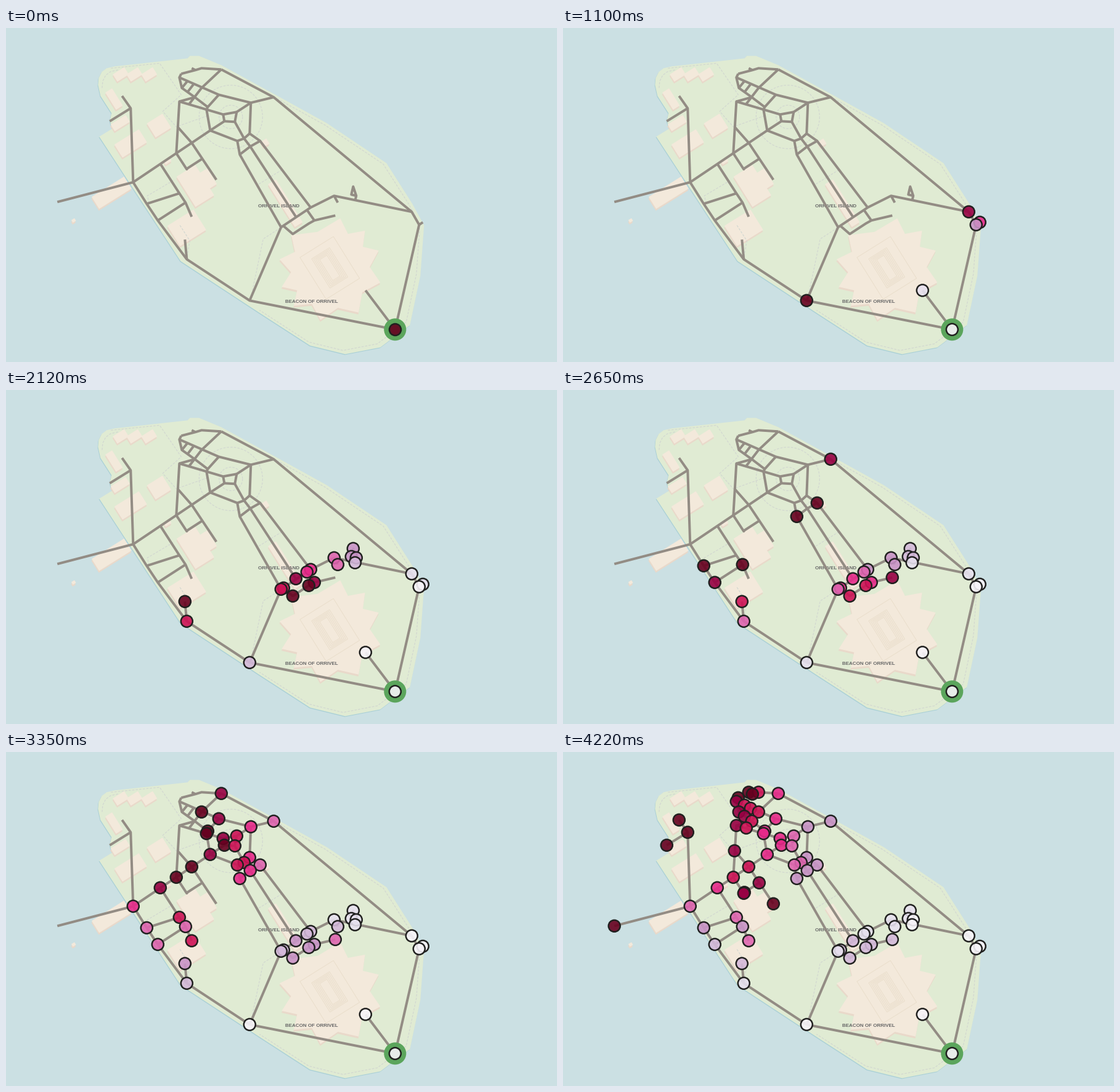
Write a matplotlib script that moves like this. It is 894 px wide and 542 px high and loops after 7970 ms.

```python
import numpy as np
import matplotlib.pyplot as plt
from matplotlib.animation import FuncAnimation
from matplotlib.collections import LineCollection
from matplotlib.colors import to_rgba
from matplotlib.patches import Circle, Polygon

W, H, DPI = 894, 542, 64
PX = 72 / DPI  # points per pixel
LOOP, TICK = 7970, 10
TILT = np.radians(-32)  # the buildings share one grid

WATER, SHORE, LAND = "#cbe0e3", "#a9d0d6", "#e0ebd3"
BLOCK, SHADE, DETAIL = "#f3e9db", "#e9d9ca", "#e8dcc8"
DASH, PATH, LABEL = "#d2d7d1", "#938c84", "#666666"
RAMP = ["#f7f4f9", "#e7e1ef", "#d4b9da", "#c994c7", "#df65b0",
        "#e7298a", "#ce1256", "#980043", "#67001f"]

# Streets only name their bends and ends; junctions are found from these.
OUTER = [
    [(631, 489), (670, 319), (658, 298), (434, 112), (349, 67)],
    [(670, 319), (676, 315)],
    [(583, 425.5), (631, 489), (395, 442), (293, 375), (246, 312),
     (228, 285), (206, 250)],
    [(83, 282), (206, 250), (331, 166), (354, 151), (371, 152), (374, 136),
     (397, 121), (434, 112)],
    [(250, 220), (281, 268), (291, 283), (301, 306)],
    [(281, 268), (228, 285)],
    [(291, 283), (246, 312)],
    [(293, 375), (290, 343)],
]
MALL = [
    [(446, 323), (494, 291), (532, 272), (658, 298)],
    [(450, 321), (465, 334), (491, 317), (500, 312), (534, 304)],
    [(488, 295), (500, 312)],
    [(532, 272), (538, 283)],
    [(566, 280), (568, 272), (563, 257), (560, 270), (568, 272)],
    [(379, 205), (396, 192), (412, 183), (494, 291)],
    [(470, 306), (396, 192), (386, 179), (371, 152)],
    [(397, 121), (395, 171), (412, 183)],
    [(395, 171), (386, 179), (375, 183)],
]
PLAZA = [
    [(345, 108), (327, 128), (325, 132), (331, 166), (375, 183), (379, 205),
     (446, 323), (395, 442)],
    [(374, 136), (352, 140), (281, 119), (276, 203), (293, 229),
     (294, 227.5), (318, 212)],
    [(352, 140), (354, 151)],
    [(278, 160), (301, 186), (341, 246)],
    [(281, 80), (345, 108), (397, 121)],
    [(284, 74), (281, 80), (285, 97), (306, 112), (327, 128)],
    [(281, 119), (306, 112)],
    [(297, 123), (317, 97), (349, 67)],
    [(294, 86), (285, 97)],
    [(304, 91), (294, 104)],
]
# Winding lanes, drawn straight but slower to walk.
LANES = [
    [(349, 67), (317, 65), (307, 68), (284, 74)],
    [(301, 65), (307, 68)],
    [(206, 250), (202, 130), (188, 110)],
    [(202, 130), (168, 151)],
]
LANE_COST = 1.7
NORTH_SOUTH = 0.9  # cost of vertical against horizontal distance

# Rank of a reached junction -> time in ms; the wave runs evenly between.
CUES = {0: 0, 1: 150, 5: 1100, 6: 1400, 12: 1820, 24: 2470, 28: 2650,
        40: 3040, 60: 3580, -1: 4220}

COAST = np.array([
    (149, 92), (150, 81), (155, 71), (163, 65), (176, 62), (294, 49),
    (298, 45), (313, 45), (349, 60), (435, 107), (520, 154), (617, 219),
    (659, 285), (678, 320), (672, 402), (655, 482), (607, 518), (550, 529),
    (493, 515), (411, 462), (283, 378), (151, 176), (172, 163), (168, 150),
    (171, 138), (153, 110),
])

# Buildings: centre, width, depth.
HUTS = [(x, 75, 22, 14) for x in (186, 208, 232)] + [
    (175, 115, 13, 33), (185, 154, 29, 13), (248, 158, 30, 27),
    (202, 187, 47, 25), (171, 267, 62, 23), (453, 284, 15, 82),
    (420, 186, 11, 10), (262, 216, 11, 6), (109.5, 312, 6, 5),
    (307, 256, 36, 58), (323, 247, 26, 30), (293, 324, 50, 39),
]
FORT = (526, 391)
FORT_TIPS = [-79, -48, -21, 15, 57, 101, 135, 160, 191, 221]  # degrees

TRAILS = [
    [(170, 65), (249, 57), (284, 108), (254, 135), (276, 160), (327, 142)],
    [(445, 324), (417, 342), (397, 438)],
    [(410, 253), (447, 230)],
    [(232, 284), (229, 272), (273, 246)],
    [(282, 320), (298, 345), (293, 374)],
]


def polar(center, r, angle):
    return np.add(center, np.multiply(r, [np.cos(angle), np.sin(angle)]))


def box(cx, cy, w, h):
    across = polar((0, 0), w / 2, TILT)
    down = polar((0, 0), h / 2, TILT + np.pi / 2)
    signs = [(-1, -1), (1, -1), (1, 1), (-1, 1)]
    return [(cx, cy) + i * across + j * down for i, j in signs]


def star(center, tips, outer, inner):
    tips = np.radians(tips)
    after = np.append(tips[1:], tips[0] + 2 * np.pi)
    points = []
    for tip, notch in zip(tips, (tips + after) / 2):
        points += [polar(center, outer, tip), polar(center, inner, notch)]
    return points


def ring(center, r):
    return [polar(center, r, a) for a in np.linspace(0, 2 * np.pi, 80)]


def inset(points):
    middle = (COAST.min(axis=0) + COAST.max(axis=0)) / 2
    return middle + 0.975 * (points - middle)


def fill(ax, points, color, shift=(0, 0)):
    ax.add_patch(Polygon(np.add(points, shift), fc=color, ec="none", zorder=1))


def stage(fig):
    ax = fig.add_axes([0, 0, 1, 1])
    ax.set_xlim(-0.3, W - 0.3)
    ax.set_ylim(H - 0.3, -0.3)
    ax.axis("off")
    return ax


def draw_map(ax):
    fill(ax, COAST, SHORE, (-0.7, 1.2))
    fill(ax, COAST, LAND)
    blocks = [box(*hut) for hut in HUTS] + [star(FORT, FORT_TIPS, 84, 64)]
    for block in blocks:
        fill(ax, block, SHADE, (-0.5, 3))
    for block in blocks:
        fill(ax, block, BLOCK)
    for k in (-6, 0, 1, 2, 3, 4):
        ax.add_patch(Polygon(box(525, 389, 34 - 5 * k, 56 - 4 * k), lw=0.8 * PX,
                             fill=False, ec=DETAIL, zorder=1))
    plaza = (364.5, 144)
    trails = TRAILS + [ring(plaza, 51.5), ring(plaza, 19),
                       inset(COAST[:5]), inset(COAST[9:20])]
    ax.add_collection(LineCollection(trails, colors=DASH, linewidths=1.2 * PX,
                                     linestyles=[(0, (3, 1.8))], zorder=2))
    for x, y, name in [(442, 288, "ORRIVEL ISLAND"),
                       (495.5, 443.5, "BEACON OF ORRIVEL")]:
        ax.text(x, y, name, family="Liberation Sans", size=8 * PX,
                weight="bold", color=LABEL, ha="center",
                va="center_baseline", zorder=3)
    for street in OUTER + MALL + PLAZA + LANES:
        ax.plot(*zip(*street), color=PATH, lw=4 * PX, zorder=4,
                solid_capstyle="butt", solid_joinstyle="round")
    ax.add_patch(Circle((631, 489), 18, fc="#5ba55c", ec="none", zorder=5))


def junctions():
    found = {p for street in OUTER + MALL + PLAZA + LANES for p in street}
    return np.array(sorted(found, key=lambda p: (p[1], p[0])))


def stops(a, b, points):
    """Indices of the points lying on segment a-b, in walking order."""
    span, rel = np.subtract(b, a), points - a
    t = rel @ span / (span @ span)
    off = np.abs(rel[:, 0] * span[1] - rel[:, 1] * span[0]) / np.hypot(*span)
    on = np.flatnonzero((t > -1e-9) & (t < 1 + 1e-9) & (off < 1.3))
    return on[np.argsort(t[on])]


def walk(points, start):
    """Shortest distance from the start to every junction."""
    links = []
    for streets, cost in [(OUTER + MALL + PLAZA, 1), (LANES, LANE_COST)]:
        for street in streets:
            for a, b in zip(street, street[1:]):
                chain = stops(a, b, points)
                for i, j in zip(chain, chain[1:]):
                    dx, dy = points[i] - points[j]
                    links.append((i, j, cost * np.hypot(dx, NORTH_SOUTH * dy)))
    dist = np.full(len(points), np.inf)
    dist[start] = 0
    for _ in points:
        for i, j, length in links:
            dist[i] = min(dist[i], dist[j] + length)
            dist[j] = min(dist[j], dist[i] + length)
    return dist


# Sorted from north to south, so the start comes last and southern dots
# overlap northern ones.
nodes = junctions()
dist = walk(nodes, -1)
rank = np.argsort(np.argsort(dist))
arrival = np.interp(dist, np.sort(dist)[list(CUES)], list(CUES.values()))

fig = plt.figure(figsize=(W / DPI, H / DPI), dpi=DPI, facecolor=WATER)

# Render the still map once and reuse it as a backdrop.
base = stage(fig)
draw_map(base)
fig.canvas.draw()
backdrop = np.asarray(fig.canvas.buffer_rgba()).copy()
base.remove()
fig.figimage(backdrop, zorder=-1)

ax = stage(fig)
dots = ax.scatter([], [], s=(19 * PX) ** 2, lw=2.5 * PX, edgecolors="#20201f")
FILLS = np.array([to_rgba(c, 0.9) for c in RAMP])


def draw(frame):
    shown = np.flatnonzero(arrival < (frame + 0.5) * TICK)
    last = len(shown) - 1
    # The newest dot is always darkest; the start fades once others join.
    shade = len(RAMP) * rank[shown] // last if last else np.array([8])
    dots.set_offsets(nodes[shown])
    dots.set_facecolors(FILLS[np.minimum(shade, len(RAMP) - 1)])
    return dots,


anim = FuncAnimation(fig, draw, frames=LOOP // TICK, interval=TICK,
                     init_func=lambda: draw(0), repeat=True, repeat_delay=0,
                     cache_frame_data=False)
plt.show()
```
